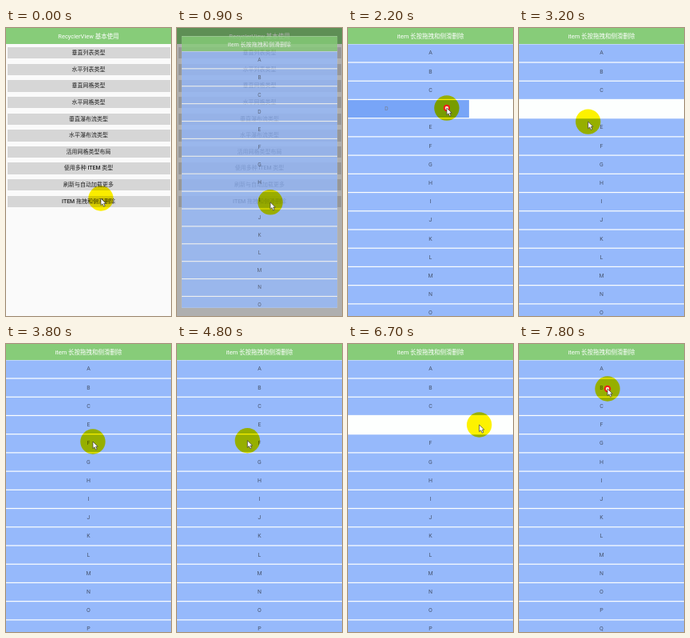
Write an HTML page that moves like this. It is 207x360 px and loops after 8 s.

```html
<!DOCTYPE html>
<html lang="zh-CN">
<head>
<meta charset="utf-8">
<style>
html, body { margin: 0; width: 100%; height: 100%; overflow: hidden; }
body, #menu { background: #fafafa; }
#stage, #menu, #page { position: absolute; left: 0; top: 0; width: 207px; height: 360px; overflow: hidden; }
#stage { font: 7px Roboto, "Noto Sans CJK SC", "Noto Sans CJK", sans-serif; text-align: center; isolation: isolate; }
#page { background: #fdfffe; }
h1 { position: absolute; margin: 0; width: 100%; height: 20px; background: #87cc79; color: #fff; font: inherit; font-size: 7.5px; line-height: 21.5px; }
.item { position: absolute; left: 1.5px; width: 204px; height: 14.4px; line-height: 15.4px; background: #d6d6d6; color: #222; font-weight: 500; }
.row { position: absolute; left: 0; top: 0; width: 207px; height: 21.7px; line-height: 23px; background: #96b9fb; color: #46536c; }
.row.held { background: #4985f5; }
#dim { position: absolute; inset: 0; background: #000; }
#halo, #pointer { position: absolute; left: 0; top: 0; overflow: visible; }
#halo { mix-blend-mode: multiply; }
</style>
</head>
<body>
<div id="stage">
  <div id="menu"><h1>RecyclerView 基本使用</h1></div>
  <div id="dim"></div>
  <div id="page"><h1>item 长按拖拽和侧滑删除</h1></div>
  <svg id="halo" width="1" height="1"><circle r="15.7" fill="#fff200"/></svg>
  <svg id="pointer" width="1" height="1">
    <circle id="ring" r="3.2" fill="#ffe9c0" stroke="#f01818" stroke-width="2"/>
    <path d="M0 0V8.6L2 6.8L3.6 10.2L5.2 9.4L3.7 6.2H6.3Z" fill="#fff" stroke="#333" stroke-width=".7"/>
  </svg>
</div>
<script>
const $ = id => document.getElementById(id);
const TOP = 20.4, PITCH = 23.22, WIDTH = 207;

function add(parent, cls, text) {
  const el = document.createElement('div');
  el.className = cls;
  el.textContent = text;
  parent.append(el);
  return el;
}

['垂直列表类型', '水平列表类型', '垂直网格类型', '水平网格类型', '垂直瀑布流类型', '水平瀑布流类型',
 '活用网格类型布局', '使用多种 ITEM 类型', '刷新与自动加载更多', 'ITEM 拖拽和侧滑删除']
  .forEach((text, i) => add($('menu'), 'item', text).style.top = 24 + i * 20.63 + 'px');

const rows = [...'ABCDEFGHIJKLMNOPQRS'].map(c => add($('page'), 'row', c));

// cursor stops: time, x, y
const path = [
  [0, 119, 213], [900, 117, 218], [1800, 172, 48], [1950, 179, 100], [2200, 124, 100],
  [2700, 68, 113], [3800, 109, 122], [5400, 76, 120], [5700, 71, 101], [5850, 71, 101],
  [6300, 164, 101], [6900, 165, 101], [7600, 111, 56], [8000, 111, 56]
];
// each touch presses a row; a row dragged aside leaves on that side
const touches = [
  { row: 3, down: 1950, up: 2800 },
  { row: 4, down: 5750, up: 6350 },
  { row: 1, down: 7650, up: 8000 }
];

const ramp = (t, a, b) => Math.min(1, Math.max(0, (t - a) / (b - a)));
const ease = (t, a, b) => { const p = ramp(t, a, b); return p * p * (3 - 2 * p); };

function cursorAt(t) {
  const i = path.findIndex(k => k[0] >= t) || 1;
  const [a, ax, ay] = path[i - 1], [b, bx, by] = path[i], p = ramp(t, a, b);
  return [ax + (bx - ax) * p, ay + (by - ay) * p];
}

function slide(t, { down, up }) {
  if (t < down) return 0;
  const dx = cursorAt(Math.min(t, up))[0] - cursorAt(down)[0];
  return dx + (Math.sign(dx) * WIDTH - dx) * ramp(t, up, up + 300);
}

function draw(now) {
  const t = now % 8000;
  const [x, y] = cursorAt(t);

  $('dim').style.opacity = 0.3 * ramp(t, 650, 850);
  $('page').style.opacity = ramp(t, 700, 950);
  $('page').style.transform = `scale(${0.885 + 0.115 * ease(t, 700, 1100)})`;

  rows.forEach((row, i) => {
    let slot = i, dx = 0;
    for (const touch of touches) {
      if (touch.row < i) slot -= ease(t, touch.up + 550, touch.up + 850);
      if (touch.row === i) dx = slide(t, touch);
    }
    row.style.transform = `translate(${dx}px, ${TOP + slot * PITCH}px)`;
    row.style.opacity = 1 - Math.abs(dx) / WIDTH;
    row.classList.toggle('held', Math.abs(dx) > 2);
  });

  $('halo').style.transform = $('pointer').style.transform = `translate(${x}px, ${y}px)`;
  $('ring').style.display = touches.some(({ down, up }) => t >= down && t < up) ? '' : 'none';
  requestAnimationFrame(draw);
}
draw(performance.now());
</script>
</body>
</html>
```
